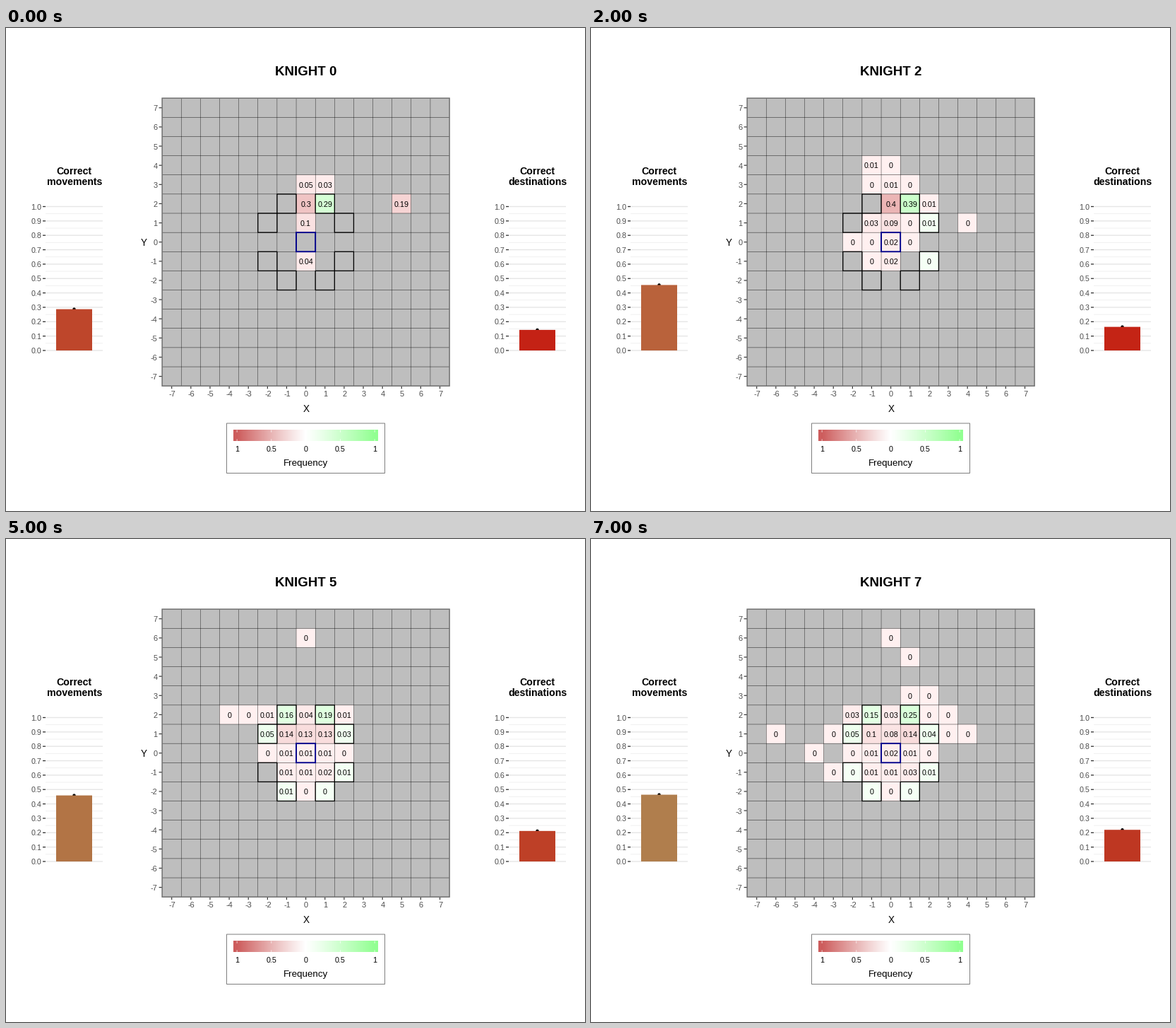
A matplotlib script for the animation above (8 s loop, 820 px wide and 683 px high).

```python
import numpy as np
import matplotlib
import matplotlib.pyplot as plt
from matplotlib.animation import FuncAnimation
from matplotlib.patches import Circle, Rectangle

W, H, DPI = 820, 683, 64
PT = 72 / DPI  # points per pixel
CX, CY, CELL = 424.6, 302.7, 27.13
BASE, SCALE = 456, 203.5
BAR_X = (96.5, 752.5)
GREY = "#7f7f7f"

matplotlib.rcParams["font.family"] = "Liberation Sans"

# Board rows per step: y -> (first x, frequencies), "-" is an empty square
FREQS = [
    {3: (0, ".05 .03"), 2: (0, ".3 .29 - - - .19"), 1: (0, ".1"),
     -1: (0, ".04")},
    {4: (0, ".01"), 3: (0, ".02 .01"), 2: (0, ".38 .37 .01 - - .02"),
     1: (-1, ".02 .1 0"), 0: (-1, "0 .02"), -1: (0, ".03")},
    {4: (-1, ".01 0"), 3: (-1, "0 .01 0"), 2: (0, ".4 .39 .01"),
     1: (-1, ".03 .09 0 .01 - 0"), 0: (-2, "0 0 .02 0"),
     -1: (-1, "0 .02 - 0")},
    {5: (1, "0"), 4: (1, "0 0"), 2: (-4, ".01 0 - .02 .14 .33 .01"),
     1: (-4, "0 - .01 0 .21 .1 .12"), 0: (-2, "0 - .01 .02 0"),
     -1: (-2, "0 0 0 0 0")},
    {6: (0, "0"), 2: (-4, ".01 0 0 .17 .07 .18 .02"),
     1: (-2, ".01 .12 .15 .12 .04"), 0: (-2, "0 .01 .01 .03 0"),
     -1: (-1, ".01 .01 .01 .02"), -2: (-1, "0 0 0")},
    {6: (0, "0"), 2: (-4, "0 0 .01 .16 .04 .19 .01"),
     1: (-2, ".05 .14 .13 .13 .03"), 0: (-2, "0 .01 .01 .01 0"),
     -1: (-1, ".01 .01 .02 .01"), -2: (-1, ".01 0 0")},
    {6: (1, "0"), 3: (1, "0"), 2: (-4, "0 0 .02 .15 .02 .2 0 - 0"),
     1: (-4, "0 - .08 .15 .12 .14 .02"),
     0: (-2, "0 .01 .01 0 0 - - 0"), -1: (-1, ".01 .01 .02 0"),
     -2: (-1, ".01 0 .01")},
    {6: (0, "0"), 5: (1, "0"), 3: (1, "0 0"),
     2: (-2, ".03 .15 .03 .25 0 0"),
     1: (-6, "0 - - 0 .05 .1 .08 .14 .04 0 0"),
     0: (-4, "0 - 0 .01 .02 .01 0"),
     -1: (-3, "0 0 .01 .01 .03 .01"), -2: (-1, "0 0 0")},
]

# Score and colour of the two bars at each step
MOVES = [(.287, "#be462b"), (.41, "#bb5634"), (.455, "#b9623b"),
         (.46, "#b47646"), (.452, "#b66a40"), (.459, "#b27445"),
         (.46, "#b27445"), (.464, "#b07e4d")]
DESTS = [(.143, "#c42215"), (.155, "#c42315"), (.164, "#c42415"),
         (.187, "#bf3c25"), (.204, "#be452b"), (.212, "#be4027"),
         (.218, "#be3823"), (.22, "#be3722")]

RED, GREEN, WHITE = (205, 92, 92), (146, 255, 146), (255, 255, 255)


def mix(a, b, t):
    return (np.array(a) + (np.array(b) - np.array(a)) * t) / 255


def tint(v):
    """Red for negative values, green for positive, pale near zero."""
    if v < 0:
        return mix((255, 240, 240), RED, -v)
    return mix((245, 255, 245), GREEN, v ** .9)


def ramp(v):
    """Legend colour, passing smoothly through white at zero."""
    return mix(WHITE, RED if v < 0 else GREEN, min(abs(v), 1) ** 1.12)


def is_jump(x, y):
    return {abs(x), abs(y)} == {1, 2}


fig = plt.figure(figsize=(W / DPI, H / DPI), dpi=DPI, facecolor="white")
ax = fig.add_axes([0, 0, 1, 1])


def line(x0, y0, x1, y1, color, width, z=1):
    return ax.plot([x0, x1], [y0, y1], color=color, lw=width * PT,
                   solid_capstyle="butt", snap=False, zorder=z)[0]


def box(x, y, w, h, fill="none", edge="none", width=0, z=1):
    return ax.add_patch(Rectangle((x, y), w, h, fc=fill, ec=edge,
                                  lw=width * PT, joinstyle="miter",
                                  snap=False, zorder=z))


def text(x, y, s, size, color="black", ha="center", weight="normal"):
    """Text whose capitals are centred on y."""
    return ax.text(x, y + .36 * size, s, fontsize=size * PT, color=color,
                   ha=ha, va="baseline", weight=weight, zorder=6)


def square(x, y, **style):
    return box(CX + (x - .5) * CELL, CY - (y + .5) * CELL, CELL, CELL, **style)


def draw_board():
    half = 7.5 * CELL
    left, right, top, bottom = CX - half, CX + half, CY - half, CY + half
    box(left, top, 2 * half, 2 * half, fill="#bebebe", z=1)
    for i in range(-7, 8):
        x, y = CX + i * CELL, CY - i * CELL
        if i < 7:
            edge = CELL / 2
            line(x + edge, top, x + edge, bottom, "black", .38, 3)
            line(left, y - edge, right, y - edge, "black", .42, 3)
        line(x, bottom, x, bottom + 4, "#333333", 1.2)
        line(left - 4.5, y, left, y, "#333333", 1.2)
        text(x + .5, 517.5, str(i), 11, "#4d4d4d")
        text(214.5, y + .5, str(i), 11, "#4d4d4d", "right")
        for j in range(-7, 8):
            if is_jump(i, j):
                square(i, j, edge="black", width=1.3, z=4)
    square(0, 0, edge="#00008b", width=1.9, z=5)
    box(left, top, 2 * half, 2 * half, edge="#6f6f6f", width=1.5, z=4)
    text(CX + .2, 538, "X", 13.5)
    text(195.5, CY + .3, "Y", 13.5)


def draw_scale(x, title):
    for row, word in enumerate(("Correct", title)):
        text(x + .3, 201.7 + 15 * row, word, 14.1, weight="bold")
    for i in range(21):
        y = BASE - i * SCALE / 20
        major = i % 2 == 0
        line(x - 40.5, y, x + 40.5, y, "#e6e6e6" if major else "#ebebeb",
             1.4 if major else .7)
        if major:
            line(x - 44.5, y, x - 40.5, y, "#333333", 1.3)
            text(x - 46.3, y + .3, f"{i / 20:.1f}", 10.7, "#4d4d4d", "right")


def draw_legend():
    box(312.5, 559, 224, 70.5, edge=GREY, width=1)
    left, right, top, bottom = 322, 527, 568.5, 584.5
    colors = np.array([[ramp(v) for v in np.linspace(-1.05, 1.05, 205)]])
    ax.imshow(colors, extent=(left, right, bottom, top), aspect="auto",
              interpolation="nearest", zorder=2)
    for i in range(-2, 3):
        x = CX + i * 48.75
        line(x, top, x, top + 3.2, "white", .7, 3)
        line(x, bottom - 3.2, x, bottom, "white", .7, 3)
        text(x, 595.5, f"{abs(i) / 2:g}", 10.7)
    text(CX, 614.3, "Frequency", 13.4)


draw_board()
draw_scale(BAR_X[0], "movements")
draw_scale(BAR_X[1], "destinations")
draw_legend()
title = text(CX, 60.2, "", 18.7, weight="bold")

bars, dots = [], []
for bar_x in BAR_X:
    dots.append(ax.add_patch(Circle((bar_x, BASE), 2.2, fc="black", ec="none",
                                    zorder=2)))
    bars.append(box(bar_x - 25.5, BASE, 51, 0, z=3))

ax.set_xlim(0, W)
ax.set_ylim(H, 0)
ax.axis("off")

tiles = []


def update(step):
    while tiles:
        tiles.pop().remove()
    title.set_text(f"KNIGHT {step}")
    for y, (start, row) in FREQS[step].items():
        for x, cell in enumerate(row.split(), start):
            if cell == "-":
                continue
            v = float(cell)
            fill = tint(v if is_jump(x, y) else -max(v, 1e-6))
            tiles.append(square(x, y, fill=fill, z=2))
            tiles.append(text(CX + x * CELL, CY - y * CELL + .4, f"{v:g}",
                              10.7))
    for bar, dot, (value, color) in zip(bars, dots, (MOVES[step], DESTS[step])):
        top = BASE - value * SCALE
        bar.set(y=top, height=BASE - top, facecolor=color)
        dot.center = (dot.center[0], top)
    return []


anim = FuncAnimation(fig, update, frames=len(FREQS), interval=1000,
                     repeat=True, repeat_delay=0, blit=False)
plt.show()
```
